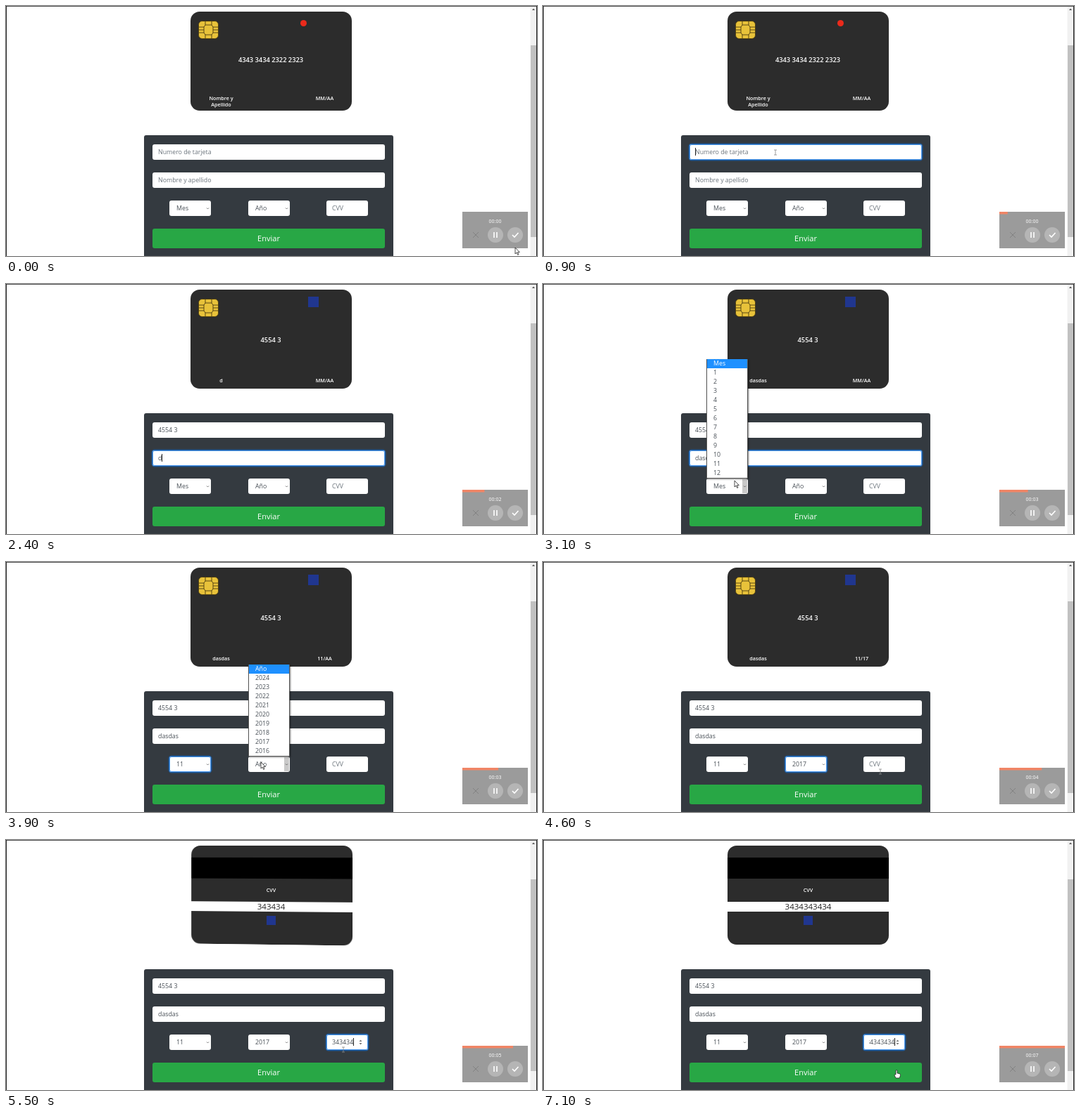
An HTML page for the animation above (7200 ms loop, 754x356 px).

```html
<!DOCTYPE html>
<html lang="es">
<head>
<meta charset="utf-8">
<title>Tarjeta</title>
<style>
html, body { margin: 0; width: 754px; height: 356px; overflow: hidden; background: #fff; }
body { position: relative; font: 8.8px/22px "Open Sans", sans-serif; color: #495057; }
div, svg { position: absolute; box-sizing: border-box; }

#scene { inset: 0; perspective: 340px; perspective-origin: 373px 8px; }
#card { left: 261.5px; top: 8px; width: 229px; height: 141px; transform-origin: 111.5px 0; transform-style: preserve-3d; }
.side { inset: 0; border-radius: 13px; overflow: hidden; background: #2c2c2c; color: #fff;
  font-weight: 600; text-align: center; backface-visibility: hidden; transform-origin: 111.5px 0; }
.back { transform: rotateY(180deg); }
.side > div { left: 0; width: 100%; }
.side > #number { font-size: 9.3px; }
.side > .small { font-size: 7.2px; line-height: 9px; width: 52px; white-space: pre; }
.side > #stripe { top: 17px; height: 30px; background: #000; }
.side > #code { top: 79.5px; height: 14px; background: #fff; color: #222; font-size: 11.5px; font-weight: 400; line-height: 14px; }
.side > #brand { left: 156.5px; top: 11.5px; width: 9px; height: 9px; border-radius: 50%; background: #eb2a1b; }
.side > #brand.alt { left: 167px; top: 10px; width: 15px; height: 15px; border-radius: 0; background: #20368f; }
.side > #brandBack { left: 108px; top: 100px; width: 13px; height: 13px; background: #20368f; }

#form { left: 196px; top: 184px; width: 354px; height: 180px; border-radius: 3px; background: #343a40; }
.field { height: 22px; border-radius: 3px; background: #fff; }
.field.focus { box-shadow: inset 0 0 0 1px #4f9bf0, 0 0 0 1.5px rgba(0, 123, 255, .45); }
.field > div { left: 8px; right: 8px; top: 0; height: 22px; overflow: hidden; white-space: pre; }
.field i { display: inline-block; width: 1px; height: 11px; margin-right: -1px; vertical-align: -2px; background: #222; }
.field em { font-style: normal; color: #6c757d; }
.wide { left: 208px; width: 330px; }
.narrow { top: 277px; width: 59px; }
.narrow.select > div { left: 10px; }
.narrow svg { right: 1px; top: 1px; width: 7px; height: 20px; }
.open svg { background: #c9c9c9; }
#send { left: 208px; top: 317px; width: 330px; height: 28px; border-radius: 3px; background: #28a745;
  color: #fff; font-size: 11px; line-height: 28px; text-align: center; }
.list { bottom: 79.5px; width: 59px; background: #fff; line-height: 12.95px; border: solid #555; border-width: 0 1px 1px;
  box-shadow: 1px 1px 2px rgba(0, 0, 0, .5); }
.list p { margin: 0; padding-left: 9px; height: 12.95px; }
.list .on { background: #1e90ff; color: #fff; }
#clock { left: 648px; top: 300px; width: 93px; line-height: 13px; font-size: 7px; color: #fff; text-align: center; }
</style>
</head>
<body>
<div id="scene"><div id="card">
  <div class="side">
    <svg style="left:11.5px;top:13px" width="30" height="27" fill="none" stroke="#4a3c10" stroke-width=".9">
      <rect x=".5" y=".5" width="28" height="25" rx="5" fill="#e8c23a"/>
      <path d="M10 1V6L8 9V17L10 20V25M19 1V6L21 9V17L19 20V25M10 6H19M10 20H19M1 9H8M1 17H8M21 9H28M21 17H28M1 13H8M21 13H28"/>
    </svg>
    <div id="brand"></div>
    <div id="number"></div>
    <div id="owner" class="small" style="left:18px"></div>
    <div id="expiry" class="small" style="left:165px"></div>
  </div>
  <div class="side back">
    <div id="stripe"></div>
    <div class="small" style="top:59px;width:100%">CVV</div>
    <div id="code"></div>
    <div id="brandBack"></div>
  </div>
</div></div>

<div id="form"></div>
<div class="field wide" id="numberField" style="top:197px"><div></div></div>
<div class="field wide" id="nameField" style="top:237px"><div></div></div>
<div class="field narrow select" id="monthField" style="left:232px"><div></div>
  <svg><path d="M2 9.5l1.5 1.5L5 9.5" fill="none" stroke="#555" stroke-width=".8"/></svg></div>
<div class="field narrow select" id="yearField" style="left:344px"><div></div>
  <svg><path d="M2 9.5l1.5 1.5L5 9.5" fill="none" stroke="#555" stroke-width=".8"/></svg></div>
<div class="field narrow" id="cvvField" style="left:455px"><div style="right:14px"></div>
  <svg id="spinner" style="right:7px"><path d="M1.5 9L3.5 6.5L5.5 9zM1.5 11L3.5 13.5L5.5 11z" fill="#777"/></svg></div>
<div id="send">Enviar</div>
<div class="list" id="monthList" style="left:232px"></div>
<div class="list" id="yearList" style="left:344px"></div>

<svg width="754" height="356" style="left:0;top:0">
  <path d="M0 .5H754" stroke="#555"/>
  <path d="M.5 0V356M753.5 0V356" stroke="#222"/>
  <path d="M744.5 1H753V356H744.5z" fill="#f1f1f1"/>
  <path d="M745 56H753V329H745z" fill="#c1c1c1"/>
  <path d="M747 6L749 3.5L751 6z" fill="#555"/>
  <path d="M648 293H741V345H648z" fill="#9b9b9b"/>
  <rect id="progress" x="648" y="293" height="3.5" fill="#f08566"/>
  <g fill="#b5b5b5"><circle cx="695" cy="326" r="11"/><circle cx="723" cy="326" r="11"/></g>
  <path d="M663 322L671 330M671 322L663 330" stroke="#828282"/>
  <path d="M693 322V330M697 322V330M719 326L722 329L727.5 323" fill="none" stroke="#fff" stroke-width="1.6"/>
  <g id="mouse" stroke="#222" stroke-width=".8" fill="#fff">
    <path id="arrow" d="M0 0V9L2.1 7.1L3.6 10.4L5 9.8L3.5 6.6H6.3z"/>
    <path id="beam" d="M-2 -5H2M0 -5V2M-2 2H2" stroke="#888"/>
    <path id="hand" d="M-2 -5Q-1 -6 0 -5V-1L4 0Q5 1 4 4L3 6H-2L-4 2Q-4 0 -2 1z"/>
  </g>
</svg>
<div id="clock"></div>

<script>
const $ = id => document.getElementById(id);
const LOOP = 7200, STEP = 100;
const MONTH_OPEN = 3000, MONTH_PICK = 3450, YEAR_OPEN = 3800, YEAR_PICK = 4300, FLIP = 4630;
const months = ["Mes", ...Array.from({ length: 12 }, (_, i) => i + 1)];
const years = ["Año", ...Array.from({ length: 9 }, (_, i) => 2024 - i)];

// time, x, y
const mousePath = [
  [0, 723, 344], [200, 723, 344], [800, 330, 210], [2150, 330, 210], [2300, 330, 246], [2850, 330, 246],
  [3000, 272, 280], [3150, 272, 280], [3350, 264, 257], [3450, 264, 257], [3750, 362, 285], [3950, 362, 285],
  [4200, 365, 257], [4300, 365, 257], [4600, 479, 300], [6500, 479, 300], [7000, 503, 333], [LOOP, 503, 333]
];

const within = (t, from, to) => t >= from && t < to;
const typed = (text, t, start, gap) => text.slice(0, Math.max(0, Math.floor((t - start) / gap) + 1));

function mouseAt(t) {
  const i = mousePath.findIndex(p => p[0] > t);
  const [t0, x0, y0] = mousePath[i - 1], [t1, x1, y1] = mousePath[i];
  let k = (t - t0) / (t1 - t0);
  k = k * k * (3 - 2 * k);
  return [x0 + (x1 - x0) * k, y0 + (y1 - y0) * k];
}

// The CSS "ease" curve, solved by bisection
function ease(x) {
  if (x <= 0 || x >= 1) return x <= 0 ? 0 : 1;
  const bezier = (s, a, b) => 3 * s * (1 - s) ** 2 * a + 3 * s * s * (1 - s) * b + s ** 3;
  let lo = 0, hi = 1;
  for (let i = 0; i < 24; i++) {
    const mid = (lo + hi) / 2;
    if (bezier(mid, .25, .25) < x) lo = mid; else hi = mid;
  }
  return bezier(lo, .1, 1);
}

function setInput(id, text, hint, focused, caretAge) {
  const caret = focused && Math.floor(Math.max(0, caretAge) / 500) % 2 === 0;
  const inner = $(id).firstElementChild;
  inner.innerHTML = text + (caret ? "<i></i>" : "") + (text ? "" : `<em>${hint}</em>`);
  inner.scrollLeft = 999;
  $(id).classList.toggle("focus", focused);
}

function setSelect(name, value, open, focused, items, [x, y]) {
  const field = $(name + "Field"), list = $(name + "List");
  field.firstElementChild.textContent = value;
  field.classList.toggle("focus", focused);
  field.classList.toggle("open", open);
  list.hidden = !open;
  list.style.display = open ? "" : "none";
  const row = Math.floor((y - 276.5) / 12.95) + items.length;
  const active = y < 276 && row > 0 ? row : 0;
  list.innerHTML = items.map((v, i) => `<p${i === active ? ' class="on"' : ""}>${v}</p>`).join("");
}

function draw(t) {
  const number = typed("45543", t, 1150, 250).replace(/^(.{4})(.)/, "$1 $2");
  const name = typed("dasdas", t, 2400, 100);
  const cvv = typed("3434343434", t, 4750, 150);
  const month = t < MONTH_PICK ? "Mes" : "11", year = t < YEAR_PICK ? "Año" : "2017";
  const mouse = mouseAt(t), [mx, my] = mouse;

  setInput("numberField", number, "Numero de tarjeta", within(t, 900, 2300), t - 2150);
  setInput("nameField", name, "Nombre y apellido", within(t, 2300, 3150), t - 2900);
  setInput("cvvField", cvv, "CVV", t >= FLIP, t - 6100);
  setSelect("month", month, within(t, MONTH_OPEN, MONTH_PICK), within(t, 3150, 3950), months, mouse);
  setSelect("year", year, within(t, YEAR_OPEN, YEAR_PICK), within(t, 3950, FLIP), years, mouse);
  $("spinner").style.display = t >= FLIP ? "" : "none";

  $("number").textContent = number || "4343 3434 2322 2323";
  $("number").style.top = name ? "60.5px" : "57.5px";
  $("owner").textContent = name || "Nombre y\nApellido";
  $("expiry").textContent = (t < MONTH_PICK ? "MM" : month) + "/" + (t < YEAR_PICK ? "AA" : "17");
  $("owner").style.top = $("expiry").style.top = name ? "125px" : "119px";
  $("code").textContent = cvv;
  $("brand").className = number ? "alt" : "";
  $("card").style.transform = `rotateY(${180 * ease((t - FLIP) / 1000)}deg)`;

  $("progress").setAttribute("width", 93 * t / (LOOP - STEP));
  $("clock").textContent = "00:0" + Math.floor(t / 1000);

  const overText = within(mx, 208, 538) && (within(my, 197, 220) || within(my, 237, 260)) ||
    within(mx, 455, 514) && within(my, 277, 301);
  const listOpen = within(t, MONTH_OPEN, MONTH_PICK) || within(t, YEAR_OPEN, YEAR_PICK);
  const shape = within(mx, 208, 538) && within(my, 317, 345) ? "hand" : overText && !listOpen ? "beam" : "arrow";
  for (const id of ["arrow", "beam", "hand"]) $(id).style.display = id === shape ? "" : "none";
  $("mouse").style.display = within(t, 1100, 2150) || within(t, 2400, 2900) ? "none" : "";
  $("mouse").setAttribute("transform", `translate(${mx} ${my})`);
}

function tick() {
  draw(Math.floor(performance.now() % LOOP / STEP) * STEP);
  requestAnimationFrame(tick);
}
tick();
</script>
</body>
</html>
```
